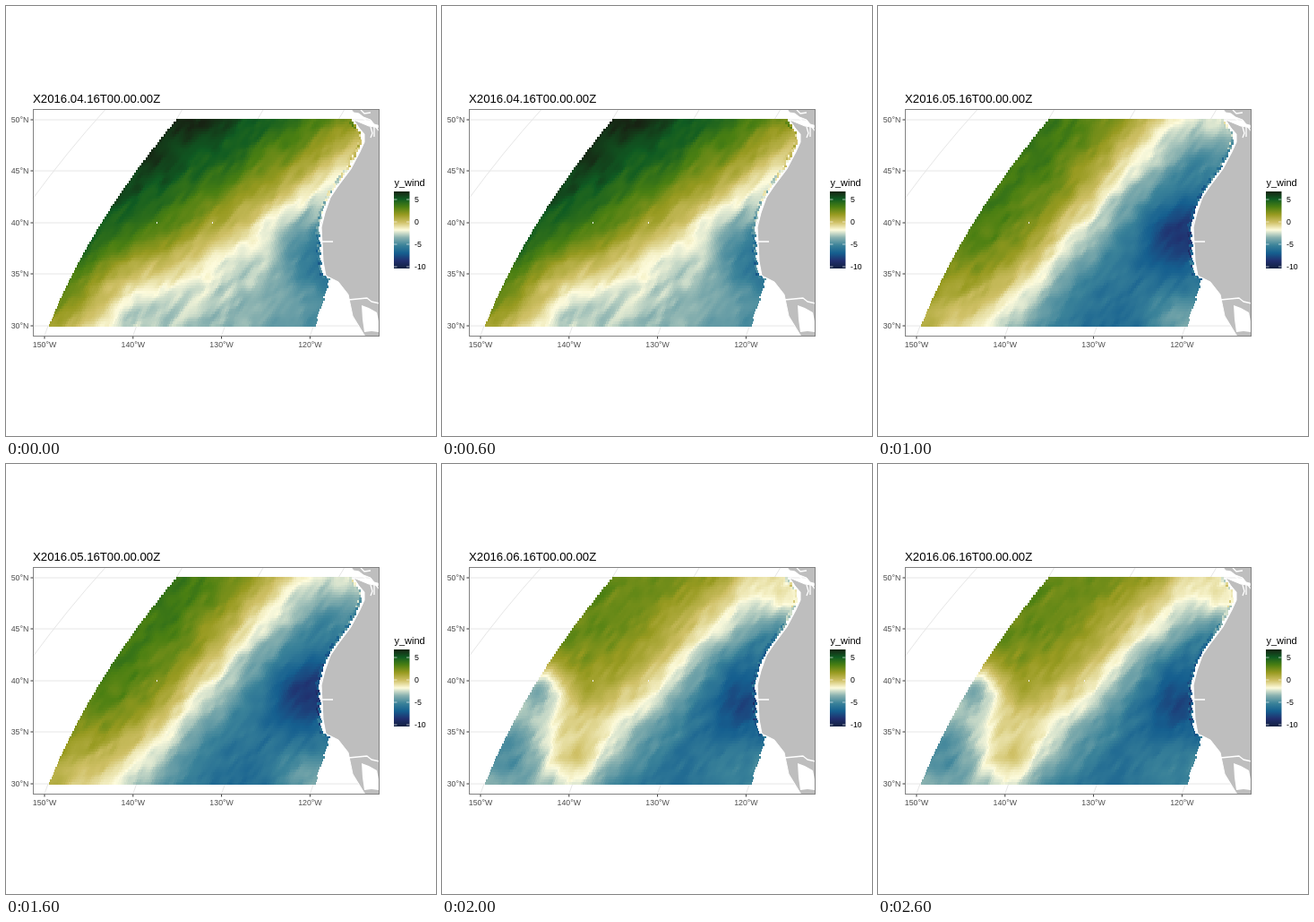
Write an HTML page with a canvas that moves like this. It is 480 px wide and 480 px high and loops after 3 s.

```html
<!DOCTYPE html>
<html lang="en">
<head>
<meta charset="utf-8">
<style>
  html, body { margin: 0; width: 100%; height: 100%; overflow: hidden; background: #fff; }
  svg, canvas { position: absolute; left: 0; top: 0; width: 480px; height: 480px; }
  text { font-family: "Liberation Sans", Arial, sans-serif; }
  .axis { font-size: 8.8px; fill: #4d4d4d; }
  .key { font-size: 8.8px; }
  #grid { fill: none; stroke: #e6e6e6; }
  .land { fill: #bebebe; stroke: #fff; stroke-linejoin: round; }
  .water { fill: none; stroke: #fff; stroke-width: 1.3; stroke-linejoin: round; }
</style>
</head>
<body>
<svg viewBox="0 0 480 480"><g id="grid"><path d="M30 215Q68 163 110.500 116"/></g></svg>
<canvas id="field" width="480" height="480"></canvas>
<svg viewBox="0 0 480 480">
  <defs>
    <clipPath id="panel"><rect x="30" y="115" width="387" height="254"/></clipPath>
    <linearGradient id="ramp" x1="0" y1="1" x2="0" y2="0"></linearGradient>
  </defs>
  <g clip-path="url(#panel)">
    <path id="coast" class="land"/>
    <path class="land" d="M385 115L388 119L394 120L399 124L407 127L411 132L418 134V115Z"/>
    <path class="water" d="M387 120L396 123L404 130L412 134L417 140M407 135L409 142L407 147M411 135V146
      M396 116L400 120L407 119M353 263H365M382 328L403 326L408 330L417 332"/>
    <path d="M397 334L405 337L414 342L416 352V364L408 363L400 364L398 350Z" fill="#fff"/>
  </g>
  <rect x="30.500" y="115.500" width="386" height="253" fill="none" stroke="#828282"/>
  <g id="axes"></g>
  <text id="title" x="30" y="108" font-size="13.200"></text>
  <text x="433.500" y="201" font-size="11">y_wind</text>
  <rect x="433" y="207" width="17.500" height="86" fill="url(#ramp)"/>
  <g id="key"></g>
</svg>
<script>
const $ = id => document.getElementById(id);
const lerp = (a, b, k) => a + (b - a) * k;
const clamp = (v, lo, hi) => Math.min(hi, Math.max(lo, v));

function add(parent, tag, attrs, text) {
  const el = document.createElementNS("http://www.w3.org/2000/svg", tag);
  for (const k in attrs) el.setAttribute(k, attrs[k]);
  if (text) el.textContent = text;
  parent.append(el);
}

// Evenly spaced colours, lowest wind first
const ramp = ["#112040", "#212f6e", "#155f8f", "#3a8299", "#87b0af", "#fdfbdc",
  "#cfc066", "#979a20", "#4a7f12", "#0f5b22", "#172313"];
const rgb = ramp.map(hex => [1, 3, 5].map(i => parseInt(hex.slice(i, i + 2), 16)));
ramp.forEach((hex, i) => add($("ramp"), "stop", { offset: i * 10 + "%", "stop-color": hex }));

function color(v) {
  const pos = clamp(v / 10, 0, 9.999), i = Math.floor(pos);
  return `rgb(${rgb[i].map((c, j) => Math.round(lerp(c, rgb[i + 1][j], pos - i)))})`;
}

// Axes, grid lines and colour key
for (let i = 0; i < 5; i++) {
  const y = 127 + Math.round(57.4 * i);
  add($("grid"), "path", { d: `M30 ${y}H417` });
  add($("axes"), "path", { d: `M27.500 ${y}H30`, stroke: "#333" });
  add($("axes"), "text", { x: 25.3, y: y + 3.2, class: "axis", "text-anchor": "end" }, `${50 - 5 * i}°N`);
}
for (let i = 0; i < 4; i++) {
  const x = 43 + 98.8 * i, top = 190 + 90.5 * i;
  add($("grid"), "path", { d: `M${x} 368l4 -11` });
  if (i < 3) add($("grid"), "path", { d: `M${top} 127l6.500 -11` });
  add($("axes"), "path", { d: `M${x} 369v2.500`, stroke: "#333" });
  add($("axes"), "text", { x, y: 381, class: "axis", "text-anchor": "middle" }, `${150 - 10 * i}°W`);
}
for (let i = 0; i < 4; i++) {
  const y = 216 + 25 * i;
  add($("key"), "path", { d: `M433 ${y}h3.500M447 ${y}h3.500`, stroke: "#fff", "stroke-width": 0.6 });
  add($("key"), "text", { x: 456, y: y + 3.4, class: "key" }, `${5 - 5 * i}`);
}

// Mainland shore from north to south
const coast = [[388, 127], [394, 136], [400, 143], [400, 152], [395, 163], [385, 182], [370, 202], [362, 214],
  [356, 231], [352, 247], [354, 285], [357, 301], [371, 308], [382, 322], [387, 346], [401, 369]];
$("coast").setAttribute("d", `M${coast.join("L")}L418 369V136L405 134Z`);

function coastX(y) {
  const i = clamp(coast.findIndex(p => p[1] > y), 1, coast.length - 1);
  const [x0, y0] = coast[i - 1], [x1, y1] = coast[i];
  return lerp(x0, x1, (y - y0) / (y1 - y0));
}

// Each month is a front through (x, y) with a heading in degrees, warm to the
// north-west and cool to the south-east, plus soft spots [x, y, radius, amount]
const months = [
  { name: "04", x: 265, y: 265, heading: 33, warm: 60, cool: 22, scale: 130,
    spots: [[350, 275, 45, -16], [135, 320, 45, -8]] },
  { name: "05", x: 232, y: 240, heading: 49.5, warm: 35, cool: 30, scale: 60,
    spots: [[330, 250, 38, -12], [345, 360, 50, 18], [395, 130, 45, 16], [60, 350, 70, -13]] },
  { name: "06", x: 258, y: 232, heading: 45, warm: 28, cool: 30, scale: 60,
    spots: [[330, 260, 50, -10], [345, 360, 60, 11], [390, 150, 28, 18],
      [60, 315, 75, -42], [110, 250, 28, -22], [145, 335, 35, 14]] }
];

function hash(x, y, seed) {
  let h = Math.imul(x, 374761393) ^ Math.imul(y, 668265263) ^ Math.imul(seed + 1, 974634777);
  h = Math.imul(h ^ (h >>> 13), 1274126177);
  return ((h ^ (h >>> 16)) >>> 0) / 2147483648 - 1;
}

function noise(x, y, seed) {
  const i = Math.floor(x), j = Math.floor(y);
  const ease = k => k * k * (3 - 2 * k);
  const u = ease(x - i), v = ease(y - j);
  return lerp(lerp(hash(i, j, seed), hash(i + 1, j, seed), u),
    lerp(hash(i, j + 1, seed), hash(i + 1, j + 1, seed), u), v);
}

// Streaks run from south-west to north-east
function streaks(x, y, seed) {
  const along = x * 0.64 - y * 0.77, across = x * 0.77 + y * 0.64;
  return 2.3 * noise(along / 30, across / 11, seed) + 2 * noise(along / 13, across / 5, seed + 7);
}

function wind(m, x, y) {
  const a = m.heading * Math.PI / 180;
  const d = (m.x - x) * Math.sin(a) + (m.y - y) * Math.cos(a);
  let v = 50 + (d > 0 ? m.warm : m.cool) * Math.tanh(d / m.scale);
  for (const [sx, sy, r, amount] of m.spots)
    v += amount * Math.exp(-((x - sx) ** 2 + (y - sy) ** 2) / (r * r));
  return v;
}

function paint(m, seed) {
  const canvas = document.createElement("canvas");
  canvas.width = canvas.height = 480;
  const ctx = canvas.getContext("2d");
  const rows = 81, cellW = 2.48, cellH = 232 / rows;
  for (let r = 0; r < rows; r++) {
    const top = Math.round(126 + r * cellH), bottom = Math.round(126 + (r + 1) * cellH);
    const y = 126 + (r + 0.5) * cellH, t = (357 - y) / 230;
    const west = 48 + 92 * t + 50 * t * t;
    const shore = coastX(y) - 2.5, end = Math.min(shore, 345 + 74 * t);
    for (let i = 0, x = west; x + cellW / 2 < end; x = west + ++i * cellW) {
      let v = wind(m, x, y) + streaks(x, y, seed);
      if (shore - x < 5) v += 9 * hash(i, r, seed);
      const left = Math.round(x);
      ctx.fillStyle = color(v);
      ctx.fillRect(left, top, Math.round(x + cellW) - left, bottom - top);
    }
  }
  return canvas;
}

const maps = months.map((m, i) => paint(m, i * 20 + 3));
const ctx = $("field").getContext("2d");
let shown = -1;

function show(now) {
  const i = Math.floor(now % 3000 / 1000);
  if (i === shown) return;
  shown = i;
  ctx.clearRect(0, 0, 480, 480);
  ctx.drawImage(maps[i], 0, 0);
  $("title").textContent = `X2016.${months[i].name}.16T00.00.00Z`;
}

function tick() {
  show(performance.now());
  requestAnimationFrame(tick);
}
show(0);
requestAnimationFrame(tick);
</script>
</body>
</html>
```
